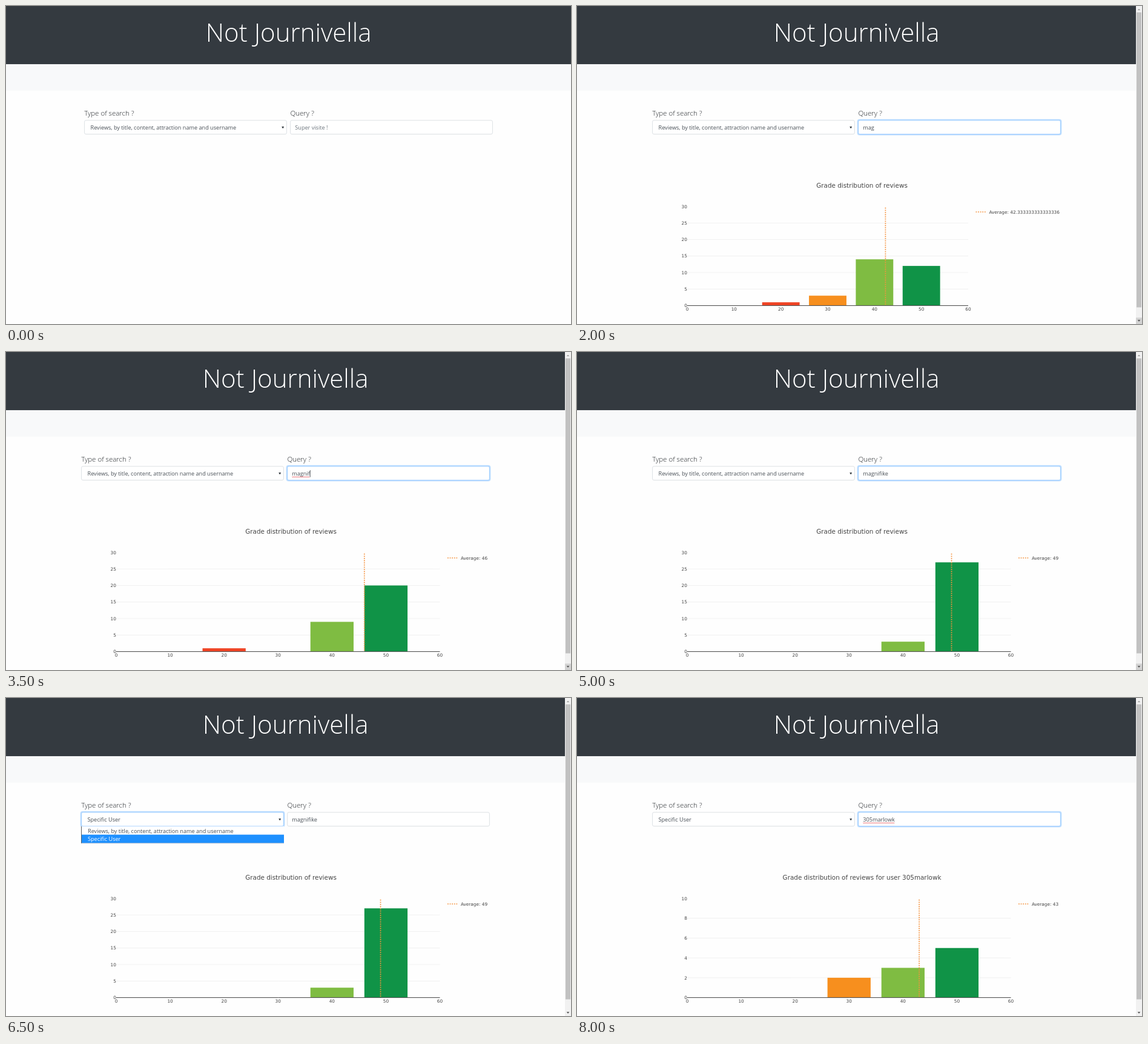
Recreate the animation shown at these times as an HTML page with a canvas. Size 933 by 525 pixels, loop 9.5 s.

```html
<!DOCTYPE html>
<html lang="en">
<head>
<meta charset="utf-8">
<title>Review search</title>
<style>
html, body { margin: 0; width: 100%; height: 100%; overflow: hidden; background: #fefefe; }
canvas { display: block; width: 933px; height: 525px; }
</style>
</head>
<body>
<canvas id="stage"></canvas>
<script>
const W = 933, H = 525, LOOP = 9500;
const canvas = document.getElementById('stage');
const ctx = canvas.getContext('2d');
const ratio = window.devicePixelRatio || 1;
canvas.width = Math.round(W * ratio);
canvas.height = Math.round(H * ratio);

const SANS = '"Open Sans", "Noto Sans", sans-serif';
const CHART = '"DejaVu Sans", Verdana, sans-serif';
const BODY = `9.15px ${SANS}`;
const TICK = `7.34px ${CHART}`;
const ORANGE = '#f5923e';
const BAR_COLORS = ['#ef4425', '#f78f1e', '#7fbc42', '#109347'];
const OPTIONS = ['Reviews, by title, content, attraction name and username', 'Specific User'];
const USER = '305marlowk';

// counts: number of reviews graded 20, 30, 40 and 50
const steps = [
  { at: 0 },
  { at: 500, focus: 'query' },
  { at: 1000, query: 'm', counts: [2, 2, 13, 13], hover: true },
  { at: 1500, query: 'ma', counts: [1, 4, 12, 13] },
  { at: 2000, query: 'mag', counts: [1, 3, 14, 12] },
  { at: 2500, query: 'magn', counts: [0, 5, 13, 12] },
  { at: 3000, query: 'magni', counts: [1, 0, 12, 17] },
  { at: 3500, query: 'magnif', counts: [1, 0, 9, 20], spell: true, caret: true },
  { at: 4000, query: 'magnifi', counts: [0, 0, 9, 21], spell: false, caret: false },
  { at: 4500, query: 'magnifik', counts: [0, 0, 5, 25] },
  { at: 5000, query: 'magnifike', counts: [0, 0, 3, 27] },
  { at: 6000, focus: 'type', open: true, hover: false },
  { at: 6500, option: 1 },
  { at: 7000, open: false },
  { at: 7500, focus: 'query' },
  { at: 8000, query: USER, user: USER, counts: [0, 2, 3, 5], spell: true }
];

function stateAt(t) {
  const state = { query: '', option: 0 };
  for (const step of steps) if (step.at <= t) Object.assign(state, step);
  return state;
}

function rect(x, y, w, h, color) {
  ctx.fillStyle = color;
  ctx.fillRect(x, y, w, h);
}

function text(str, x, y, font, color, align = 'left') {
  ctx.font = font;
  ctx.fillStyle = color;
  ctx.textAlign = align;
  ctx.fillText(str, x, y);
}

function line(x1, y1, x2, y2, color, width, dash = []) {
  ctx.strokeStyle = color;
  ctx.lineWidth = width;
  ctx.setLineDash(dash);
  ctx.beginPath();
  ctx.moveTo(x1, y1);
  ctx.lineTo(x2, y2);
  ctx.stroke();
  ctx.setLineDash([]);
}

function triangle(x, y, half, height, color) {
  ctx.fillStyle = color;
  ctx.beginPath();
  ctx.moveTo(x - half, y);
  ctx.lineTo(x + half, y);
  ctx.lineTo(x, y + height);
  ctx.fill();
}

function field(x, focused) {
  const y = 188.8, w = 333.8, h = 22.8;
  if (focused) {
    ctx.beginPath();
    ctx.roundRect(x - 2, y - 2, w + 4, h + 4, 4);
    ctx.fillStyle = '#bfdeff';
    ctx.fill();
  }
  ctx.beginPath();
  ctx.roundRect(x, y, w, h, 2.4);
  ctx.fillStyle = '#fff';
  ctx.fill();
  ctx.strokeStyle = focused ? '#80bdff' : '#ced4da';
  ctx.lineWidth = 0.7;
  ctx.stroke();
}

function squiggle(x, y, w) {
  ctx.strokeStyle = '#e8343c';
  ctx.lineWidth = 0.8;
  ctx.beginPath();
  for (let i = 0; i <= w; i++) ctx.lineTo(x + i, y + (i % 2 ? 0.5 : -0.5));
  ctx.stroke();
}

function drawForm(s, left) {
  const label = `300 11.5px ${SANS}`;
  const queryLeft = left + 340.2;
  text('Type of search ?', left, 181.4, label, '#212529');
  text('Query ?', queryLeft, 181.4, label, '#212529');

  field(left + 0.4, s.focus === 'type');
  text(OPTIONS[s.option], left + 10.3, 204.3, BODY, '#495057');
  triangle(left + 328, 198.9, 2, 3.6, '#343a40');

  field(queryLeft + 0.2, s.focus === 'query');
  const x = queryLeft + 7.9;
  text(s.query || 'Super visite !', x, 204.3, BODY, s.query ? '#495057' : '#6c757d');
  const width = ctx.measureText(s.query).width;
  if (s.spell) squiggle(x, 206.3, width);
  if (s.caret) line(x + width + 0.4, 195, x + width + 0.4, 206.5, '#343a40', 0.8);
}

function drawOptions(s) {
  rect(124, 211.8, 335, 28, '#fff');
  rect(125, s.option ? 225.6 : 212.2, 334, 13.7, '#1e90ff');
  line(124.5, 211.8, 124.5, 240, '#555b62', 1);
  line(124, 239.7, 459, 239.7, '#6f90b3', 0.6);
  OPTIONS.forEach((name, i) => {
    text(name, 135, 222.7 + i * 13.6, BODY, i === s.option ? '#fff' : '#495057');
  });
}

function drawChart(s) {
  const total = s.counts.reduce((a, b) => a + b);
  const average = s.counts.reduce((sum, n, i) => sum + n * (20 + 10 * i), 0) / total;
  const right = Number.isInteger(average) ? 716.5 : 646;
  const max = s.user ? 10 : 30, stepY = s.user ? 2 : 5;
  const x0 = 182, y0 = 494.6;
  const px = v => x0 + v * (right - x0) / 60;
  const py = v => y0 - v * 163.7 / max;

  const title = 'Grade distribution of reviews' + (s.user ? ` for user ${s.user}` : '');
  text(title, 470.5, 300.3, `10.4px ${CHART}`, '#444', 'center');

  for (let v = 0; v <= max; v += stepY) {
    if (v > 0 && v < max) line(x0, py(v), right, py(v), '#eee', 0.8);
    text(v, 181.8, py(v) + 2.7, TICK, '#444', 'right');
  }
  s.counts.forEach((n, i) => {
    const grade = 20 + 10 * i;
    rect(px(grade - 4), py(n), px(8) - x0, y0 - py(n), BAR_COLORS[i]);
  });
  line(x0, y0, right, y0, '#444', 1);
  for (let v = 0; v <= 60; v += 10) text(v, px(v), 502.7, TICK, '#444', 'center');

  const dots = [1.8, 1.8];
  line(px(average), 332.8, px(average), y0, ORANGE, 1.7, dots);
  line(right + 12.5, 340, right + 30, 340, ORANGE, 1.4, dots);
  text('Average: ' + average, right + 34.4, 342.7, TICK, '#444');
}

function drawScrollbar(hover) {
  rect(923, 0, 10, H, '#f1f1f1');
  rect(924, 10.5, 8, 487, '#c1c1c1');
  triangle(928, 7, 2.3, -2.6, '#a3a3a3');
  if (hover) rect(923, 514.5, 10, 10.5, '#d2d2d2');
  triangle(928, 518.3, 2.3, 2.6, '#505050');
}

function draw(t) {
  const s = stateAt(t);
  const hasChart = Boolean(s.counts);
  ctx.setTransform(ratio, 0, 0, ratio, 0, 0);
  rect(0, 0, W, H, '#fefefe');
  rect(0, 0, W, 96.2, '#343a40');
  rect(0, 96.2, W, 43.3, '#f8f9fa');
  text('Not Journivella', hasChart ? 461.7 : 466.7, 59.3, `300 42px ${SANS}`, '#fff', 'center');
  drawForm(s, hasChart ? 124.2 : 129.2);
  if (hasChart) {
    drawChart(s);
    drawScrollbar(s.hover);
  }
  if (s.open) drawOptions(s);
}

const start = performance.now();
function frame() {
  draw((performance.now() - start) % LOOP);
  requestAnimationFrame(frame);
}
frame();
</script>
</body>
</html>
```
